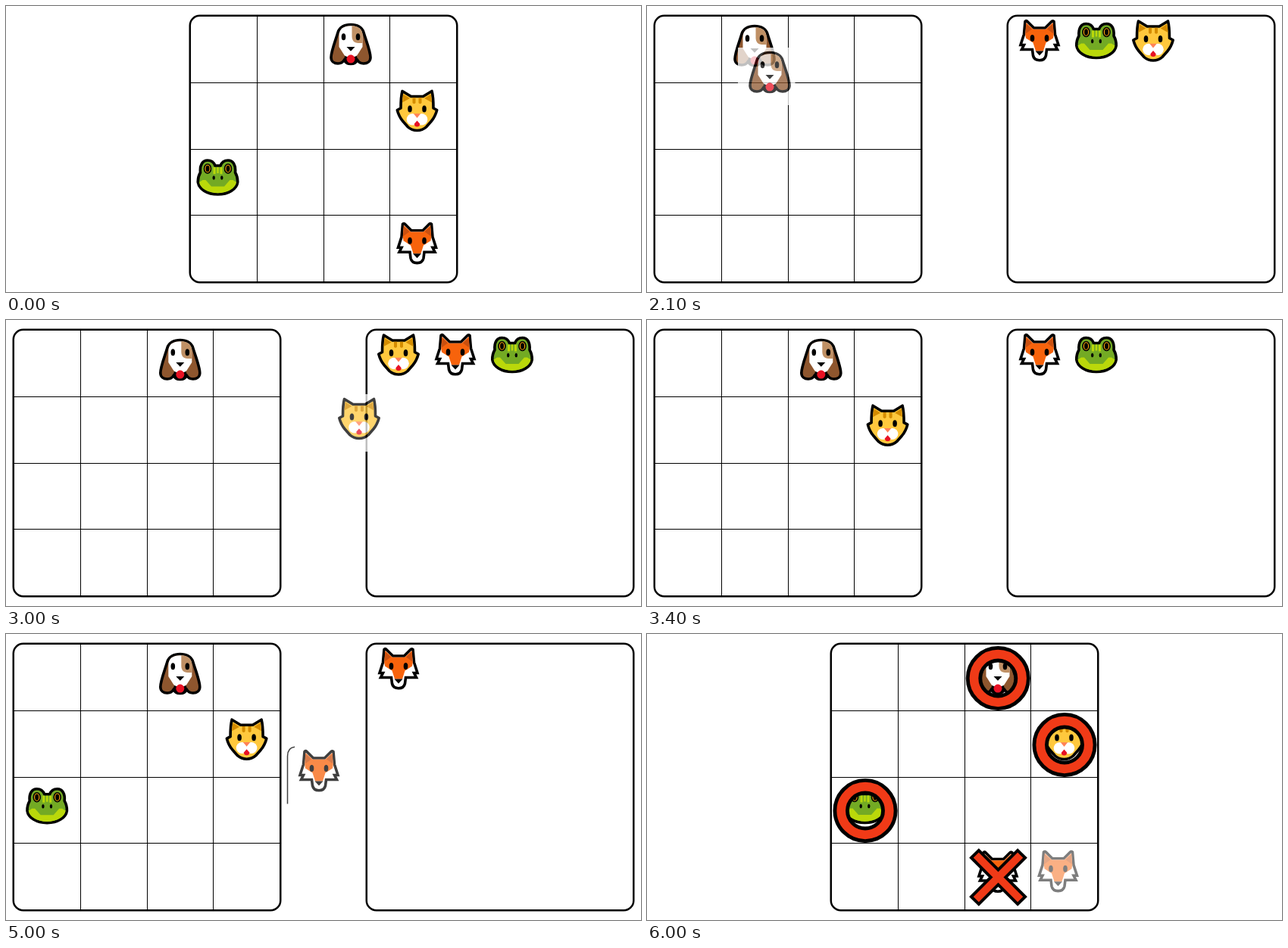
Write an HTML page that moves like this. It is 838 by 378 pixels and loops after 7500 ms.

```html
<!DOCTYPE html>
<html lang="en">
<head>
<meta charset="utf-8">
<title>Memory grid</title>
<style>
  html, body { margin: 0; width: 100%; height: 100%; overflow: hidden; background: #fff; }
  svg { display: block; }
  .outline { stroke: #000; stroke-width: 3.6; stroke-linejoin: round; }
</style>
</head>
<body>
<svg width="838" height="378" viewBox="0 0 838 378">
  <defs>
    <g id="eyes">
      <ellipse cx="18.5" cy="0" rx="2.8" ry="4.5"/>
      <ellipse cx="37.5" cy="0" rx="2.8" ry="4.5"/>
    </g>

    <g id="d">
      <path class="outline" fill="#8e562e" d="M28 2.5C20 2.5 13 6 11 13C8 23 2 38 2 46C2 51 6 54 11 54C15 54 18 52 19.5 49C21 53 24 54.5 28 54.5C32 54.5 35 53 36.5 49C38 52 41 54 45 54C50 54 54 51 54 46C54 38 48 23 45 13C43 6 36 2.5 28 2.5Z"/>
      <ellipse cx="28" cy="48" rx="9" ry="7"/>
      <path fill="#fff" d="M12.5 32V17C12.5 8 19 4.2 28 4.2S43.5 8 43.5 17V32L36.5 43C33 46.500 23 46.500 19.500 43Z"/>
      <path fill="#bf9065" d="M29.500 4.200C37.500 4.500 43.500 8 43.500 17V27H38C32 27 29.500 23 29.500 18Z"/>
      <use href="#eyes" y="18.800"/>
      <path d="M22.500 32H33.500L28 37.800Z"/>
      <path fill="#e81224" d="M28 42.500C31 42.500 33.500 45 33.500 48A5.500 5.500 0 0 1 22.500 48C22.500 45 25 42.500 28 42.500Z"/>
    </g>

    <g id="c">
      <path class="outline" fill="#ffc83d" d="M8.500 2.500L20 9.500H36L47.500 2.500Q49.500 10 49.500 25L54.200 27.500Q52 36 47 42L40 50Q35 54.500 28 54.500T16 50L9 42Q4 36 1.800 27.500L6.500 25Q6.500 10 8.500 2.500Z"/>
      <path fill="#d48c00" d="M9.800 6.500L18.500 12L8.500 17.500ZM46.200 6.500L37.500 12L47.500 17.500ZM22 11.300H26V18Q24 20.500 22 18ZM30 11.300H34V18Q32 20.500 30 18Z"/>
      <use href="#eyes" y="26"/>
      <g fill="#fff"><circle cx="21.800" cy="39.800" r="7.600"/><circle cx="34.200" cy="39.800" r="7.600"/></g>
      <path fill="#ff8257" d="M23.300 32.300H32.700L28 38Z"/>
      <path fill="#e81224" d="M28 41.500L31.500 45.500C32 48 30.500 49.500 28 49.500S24 48 24.500 45.500Z"/>
    </g>

    <g id="f"><g transform="translate(0 4)">
      <path class="outline" fill="#73aa24" d="M5 18C4 8 8 2 14.500 2C20 2 23 5 24.500 9H31.500C33 5 36 2 41.500 2C48 2 52 8 51 18Q54.500 24 54.200 31C53 40 42 47 28 47S3 40 1.800 31Q1.500 24 5 18Z"/>
      <path fill="#bad80a" d="M3.600 31L8 28H12L19.500 36.500H36.500L44 28H48L52.400 31C51 39 41 45.200 28 45.200S5 39 3.600 31ZM22 11H25V20H22ZM26.800 11H29.200V19H26.800ZM31 11H34V20H31Z"/>
      <g fill="#f7a30b" stroke="#000" stroke-width="1.600">
        <ellipse cx="14.500" cy="13" rx="4.500" ry="6"/><ellipse cx="41.500" cy="13" rx="4.500" ry="6"/>
      </g>
      <ellipse cx="14.500" cy="13" rx="2.500" ry="4.200"/><ellipse cx="41.500" cy="13" rx="2.500" ry="4.200"/>
      <ellipse cx="22.700" cy="25" rx="1.700" ry="2.800"/><ellipse cx="33.300" cy="25" rx="1.700" ry="2.800"/>
    </g></g>

    <g id="x">
      <path class="outline" style="stroke-linejoin:miter" fill="#fff" d="M9 3Q10.500 1.500 12 3L20.500 11.500H35.500L44 3Q45.500 1.500 47 3L48.500 20L53 34H48.500L51.500 40H37.500L36.500 48Q35 54.300 28 54.300T19.500 48L18.500 40H4.500L7.500 34H3L7.500 20Z"/>
      <path fill="#f7630c" d="M10.300 4.500L19.800 13.300H36.200L45.700 4.500L46.800 20L46 25L36.500 31L33 42H23L19.500 31L10 25L9.200 20Z"/>
      <path fill="#ca5010" d="M10.500 6L18 13L9.800 19ZM45.500 6L38 13L46.200 19Z"/>
      <use href="#eyes" y="25"/>
      <path d="M22.500 42H33.500L28 48Z"/>
    </g>

    <rect id="panel" x="9.750" y="12.750" width="352.500" height="352.500" rx="13" fill="#fff" stroke="#000" stroke-width="2.500"/>
    <g id="grid">
      <use href="#panel"/>
      <path stroke="#000" d="M98.500 13V365M186.500 13V365M273.500 13V365M10 101.500H362M10 189.500H362M10 276.500H362"/>
    </g>

    <g id="ring" fill="none">
      <circle r="31.800" stroke="#000" stroke-width="21.500"/>
      <circle r="31.800" stroke="#f03a17" stroke-width="11.700"/>
    </g>
    <g id="cross">
      <path stroke="#000" stroke-width="18" d="M-32-32L32 32M-32 32L32-32"/>
      <path stroke="#f03a17" stroke-width="10" d="M-29.200-29.200L29.200 29.200M-29.200 29.200L29.200-29.200"/>
    </g>
  </defs>
  <g id="stage"></g>
</svg>
<script>
// Animals: d dog, c cat, f frog, x fox.
const LOOP = 7500;
const ROWS = [24, 110.7, 198.7, 286];
const stage = document.getElementById('stage');

const use = (id, x = 0, y = 0, extra = '') => `<use href="#${id}" x="${x}" y="${y}" ${extra}/>`;
const inCell = (id, col, row) => use(id, 26.2 + 87.8 * col, ROWS[row]);
const inTray = (id, i) => use(id, 490 + 75 * i, 17.5);

function dragged(id, x, y) {
  // The fox's drag picture carries along the tray's corner.
  const corner = id === 'x'
    ? '<path fill="none" stroke="#000" stroke-width="1.5" d="M.5 76V13C.5 6 4 1.500 10 .8"/>' : '';
  return `<g opacity=".75" transform="translate(${x - 14} ${y - 4})">
    <rect width="75.500" height="76" fill="#fff"/>${corner}${use(id, 14, 4)}</g>`;
}

function play(tray, board, ghost) {
  const cells = board.split(' ').filter(Boolean).map(([id, c, r]) => inCell(id, +c, +r));
  return use('grid') + use('panel', 466) + [...tray].map(inTray).join('') +
    cells.join('') + (ghost ? dragged(...ghost) : '');
}

const question = () => use('grid', 233) + use('d', 427, 22) + use('c', 514.5, 110) +
  use('f', 251.5, 198) + use('x', 514.5, 285.3);

const answer = () => use('grid', 233) + use('d', 435, 24) + use('c', 522.5, 111) +
  use('f', 259.5, 198.5) + use('x', 435, 286) + use('x', 514.5, 285.3, 'opacity=".5"') +
  use('ring', 463.3, 58.5) + use('ring', 551, 146.5) + use('ring', 288, 233.5) +
  use('cross', 463.5, 321.5);

// Start time, tray order, pieces on the board (animal, column, row), dragged piece.
const moves = [
  [1200, 'xfdc', ''],
  [1800, 'xfdc', '', ['d', 612, 47]],
  [1900, 'xfc', 'd21', ['d', 257, 86]],
  [2000, 'xfc', 'd21', ['d', 203, 96]],
  [2100, 'xfc', 'd10', ['d', 134, 59]],
  [2200, 'xfc', 'd10', ['d', 124, 50]],
  [2300, 'xfc', 'd10', ['d', 150, 45]],
  [2400, 'xfc', 'd20', ['d', 185, 40]],
  [2500, 'xfc', 'd20'],
  [3000, 'cxf', 'd20', ['c', 438, 102]],
  [3100, 'cxf', 'd20', ['c', 345, 97]],
  [3200, 'xf', 'd20 c31', ['c', 312, 108]],
  [3300, 'xf', 'd20 c31', ['c', 304, 109]],
  [3400, 'xf', 'd20 c31'],
  [4000, 'xf', 'd20 c31', ['f', 545, 45]],
  [4100, 'xf', 'd20 c31', ['f', 360, 104]],
  [4200, 'x', 'd20 c31 f12', ['f', 128, 193]],
  [4300, 'x', 'd20 c31 f12', ['f', 84, 204]],
  [4400, 'x', 'd20 c31 f02', ['f', 50, 206]],
  [4500, 'x', 'd20 c31 f02'],
  [5000, 'x', 'd20 c31 f02', ['x', 385, 152.5]],
  [5100, '', 'd20 c31 f02 x32', ['x', 290, 220]],
  [5200, '', 'd20 c31 f02 x23', ['x', 214, 268]],
  [5300, '', 'd20 c31 f02 x23', ['x', 183, 288]],
  [5400, '', 'd20 c31 f02 x23', ['x', 190, 287]],
  [5500, '', 'd20 c31 f02 x23']
];
const scenes = [
  [0, question()],
  ...moves.map(([t, ...rest]) => [t, play(...rest)]),
  [6000, answer()]
];

let shown;
function draw() {
  const t = performance.now() % LOOP;
  const scene = scenes.findLast(s => s[0] <= t);
  if (scene !== shown) stage.innerHTML = (shown = scene)[1];
  requestAnimationFrame(draw);
}
draw();
</script>
</body>
</html>
```
